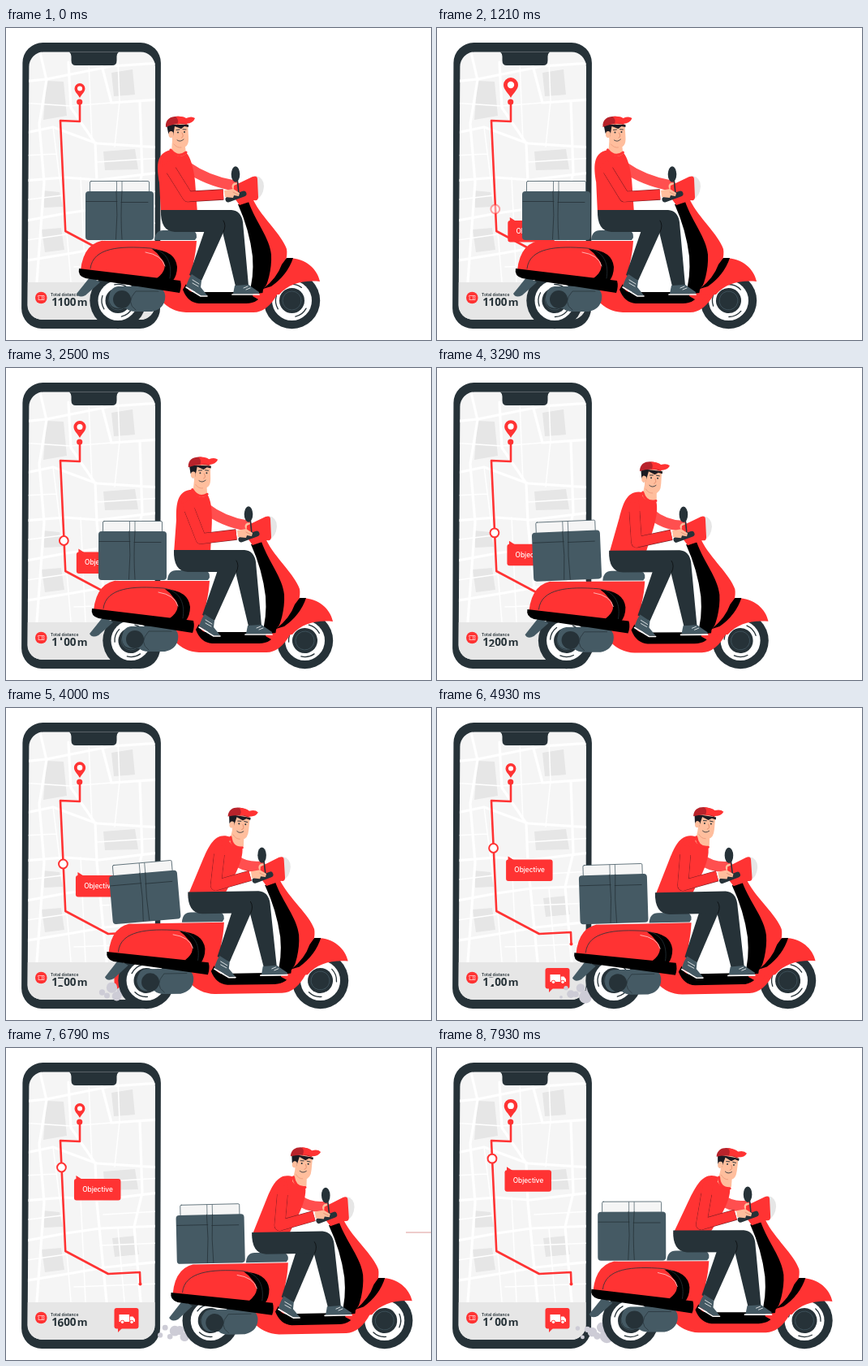
An HTML page with a canvas that plays this animation: 524 by 384 pixels, repeating every 8000 ms.

```html
<!DOCTYPE html>
<html lang="en">
<head>
<meta charset="utf-8">
<title>Scooter delivery</title>
<style>
html, body { margin: 0; width: 100%; height: 100%; overflow: hidden; background: #fff; }
canvas { display: block; width: 524px; height: 384px; }
</style>
</head>
<body>
<canvas id="stage"></canvas>
<script>
const W = 524, H = 384, LOOP = 8000;
const RED = '#ff3333', DARK = '#263238', SLATE = '#455a64', SKIN = '#ffbe9d', BLACK = '#000';
const canvas = document.getElementById('stage');
const ctx = canvas.getContext('2d');
const dpr = window.devicePixelRatio || 1;
canvas.width = W * dpr;
canvas.height = H * dpr;

// Monotone cubic through [time, value] points
function track(...pts) {
  const secant = i => (pts[i + 1][1] - pts[i][1]) / (pts[i + 1][0] - pts[i][0]);
  const slopes = pts.map((_, i) => {
    if (i === 0) return secant(0);
    if (i === pts.length - 1) return secant(i - 1);
    const a = secant(i - 1), b = secant(i);
    return a * b <= 0 ? 0 : 2 * a * b / (a + b);
  });
  return t => {
    let i = 0;
    while (i < pts.length - 2 && t > pts[i + 1][0]) i++;
    const [t0, v0] = pts[i], [t1, v1] = pts[i + 1];
    const d = t1 - t0, u = Math.min(1, Math.max(0, (t - t0) / d)), w = 1 - u;
    return v0 * (1 + 2 * u) * w * w + slopes[i] * d * u * w * w
      + v1 * u * u * (3 - 2 * u) - slopes[i + 1] * d * u * u * w;
  };
}

const rideX = track([0, 0], [1210, 7], [2500, 16], [3430, 23], [4000, 35], [4930, 80],
  [5140, 90], [6000, 112], [6500, 115], [6850, 114], [7300, 111.5], [7790, 105], [8000, 98]);
const lean = track([0, 0], [1210, .01], [2500, .25], [4000, 1], [4930, .96], [6790, .97], [8000, 1.08]);
const tilt = track([0, 0], [2500, 0], [3400, -.3], [4000, -.9], [4930, -1.15], [6790, -1.1], [8000, -.1]);
const boxTilt = track([0, 0], [2500, 0], [4000, -4], [4930, -.6], [6790, -.2], [8000, 0]);
const pinTop = track([0, 68], [860, 59.5], [1210, 61], [1790, 64], [2200, 66], [2500, 65], [3000, 62.5],
  [3430, 65], [4000, 66.3], [4930, 68], [6860, 68], [7710, 65.5], [8000, 62]);
const markY = track([0, 224], [1210, 223], [2500, 212.5], [4000, 192], [4930, 172.5], [6790, 147], [8000, 135.5]);
const digit = track([0, 1], [1210, 1], [2500, 1.39], [4000, 2.5], [4930, 3.56], [6790, 5.95], [8000, 7.45]);
const ramp = (t, a, b) => Math.min(1, Math.max(0, (t - a) / (b - a)));

function fill(d, color) {
  ctx.fillStyle = color;
  ctx.fill(new Path2D(d));
}
function line(d, color, width = 1) {
  ctx.strokeStyle = color;
  ctx.lineWidth = width;
  ctx.stroke(new Path2D(d));
}
function oval(x, y, rx, ry, color) {
  ctx.beginPath();
  ctx.ellipse(x, y, rx, ry, 0, 0, 7);
  ctx.fillStyle = color;
  ctx.fill();
}
const dot = (x, y, r, color) => oval(x, y, r, r, color);
function panel(x, y, w, h, r, color) {
  ctx.beginPath();
  ctx.roundRect(x, y, w, h, r);
  ctx.fillStyle = color;
  ctx.fill();
}
function label(s, x, y, font, color, align = 'center') {
  ctx.font = font;
  ctx.textAlign = align;
  ctx.fillStyle = color;
  ctx.fillText(s, x, y);
}
function group(draw) {
  ctx.save();
  draw();
  ctx.restore();
}
function turn(x, y, deg) {
  ctx.translate(x, y);
  ctx.rotate(deg * Math.PI / 180);
  ctx.translate(-x, -y);
}

function quad(points, r) {
  const p = new Path2D(), n = points.length;
  p.moveTo((points[0][0] + points[1][0]) / 2, points[0][1]);
  for (let i = 1; i <= n; i++) p.arcTo(...points[i % n], ...points[(i + 1) % n], r);
  p.closePath();
  return p;
}
const shell = quad([[20.5, 18], [191, 18], [190, 370], [19, 370]], 25);
const screen = quad([[28.5, 29.5], [184, 29.5], [183.5, 359], [26.5, 359]], 18);

function drawMap() {
  fill('M0 0H200V384H0Z', '#f5f5f5');
  const block = '#e6e6e6';
  fill('M50 65L71 66 75 108 46 113Z', block);
  fill('M130 55L156 51 159 82 133 84Z', block);
  fill('M120 152L159 149 163 174 122 175Z', block);
  fill('M45 200L66 202 70 220 47 221Z', block);
  fill('M44 248L68 246 72 273 48 276Z', block);
  fill('M131 234L160 231 164 254 134 257Z', block);
  line('M20 66L50 63 130 47 190 43M42 30L50 64 41 118 47 190 38 312M77 42L80 98 110 142 112 190 124 312' +
    'M20 130L58 122 112 142 190 147M20 188L72 184 115 187 190 178M20 238L74 228 116 222 190 219' +
    'M118 46L130 92 190 88M165 90L168 178 158 220 166 312M20 287L76 278 122 270 190 263', '#fff', 3.2);
  line('M20 92L80 96 130 92M102 42L106 140M138 40L140 90 134 146M58 122L66 184 73 228 80 312' +
    'M20 157L62 155M112 165L190 160M20 212L70 206M92 184L98 312M116 243L190 240M120 205L190 201' +
    'M138 222L146 312M20 262L74 254M84 294L190 290', '#fff', 1.5);
}

function drawPin(t) {
  const s = (86 - pinTop(t)) / 25;
  group(() => {
    ctx.translate(91, 86);
    ctx.scale(s, s);
    fill('M0 0C-3 -6 -9 -10 -9 -16A9 9 0 0 1 9 -16C9 -10 3 -6 0 0Z', RED);
    dot(0, -16, 4.2, '#fff');
  });
}

function drawCard(t) {
  fill('M20 313H190V360H20Z', '#e6e6e6');
  dot(43.3, 332, 7.3, RED);
  line('M40 329.5H47V331Q45.8 332 47 333V334.5H40V333Q41.2 332 40 331ZM44.7 330V334', '#fff', .6);
  label('Total distance', 55, 329.5, '600 5.1px Inter, sans-serif', DARK, 'left');
  const big = '700 13.5px "Open Sans", sans-serif';
  label('1', 60, 342, big, DARK);
  label('0', 75, 342, big, DARK);
  label('0', 82.7, 342, big, DARK);
  label('m', 87.7, 342, '700 13px "Open Sans", sans-serif', DARK, 'left');
  const n = digit(t), low = Math.floor(n);
  group(() => {
    ctx.beginPath();
    ctx.rect(62, 331.5, 9.5, 11.5);
    ctx.clip();
    for (let k = low; k <= low + 1; k++) label(k % 10, 67.4, 342 + (k - n) * 18, big, DARK);
  });
  panel(133.5, 320, 30, 25.5, 3, RED);
  fill('M138 344V350L144 344Z', RED);
  fill('M139.5 328H152V337H139.5ZM152.8 330.5H156.5L159 333.7V337H152.8Z', '#fff');
  for (const x of [143.5, 155]) {
    dot(x, 337.3, 2.5, RED);
    dot(x, 337.3, 1.7, '#fff');
  }
}

function drawMarker(t) {
  const y = markY(t), x = 73 - (250 - y) * .044;
  const grow = ramp(t, 350, 1000);
  if (grow > 0) group(() => {
    ctx.translate(x + 18, y + 10);
    ctx.scale(grow, grow);
    fill('M0 0V9H14Z', RED);
    panel(-2.5, 4, 57.5, 26.5, 3, RED);
    label('Objective', 26.5, 20, '500 8.3px Inter, sans-serif', '#fff');
  });
  group(() => {
    ctx.globalAlpha = .45 * ramp(t, 70, 1210) + .55 * ramp(t, 1210, 1900);
    ctx.beginPath();
    ctx.arc(x, y, 5.4, 0, 7);
    ctx.fillStyle = '#fff';
    ctx.fill();
    ctx.strokeStyle = RED;
    ctx.lineWidth = 2;
    ctx.stroke();
  });
}

function drawPhone(t) {
  ctx.fillStyle = DARK;
  ctx.fill(shell);
  group(() => {
    ctx.clip(screen);
    drawMap();
    drawCard(t);
    fill('M76 28Q80 30 80.5 35V40Q80.5 46 86 46H131Q136.5 46 136.5 40V35Q137 30 141 28Z', DARK);
    line('M91 92V115L67 114 73.3 250 126 278 165 276 165.5 290', RED, 2.6);
    dot(90.7, 91, 3.6, RED);
    dot(165.5, 290.5, 2, RED);
    drawPin(t);
    drawMarker(t);
  });
}

// Short speed lines that pass behind the rider
function drawStreaks(t) {
  for (const start of [660, 4060, 5500, 6740]) {
    const head = Math.max(305, 524 - (t - start) * .6);
    const tail = 524 - Math.max(0, t - start - 100) * .6;
    if (t > start && tail > head) line(`M${head} 227H${tail}`, '#dd9a98', 1);
  }
}

function drawSmoke(t, x) {
  for (let i = 0; i < 40; i++) {
    const age = (t - 3450 - i * 120) / 800;
    if (age < 0 || age > 1) continue;
    const r = (7.5 + 2 * Math.sin(i * 4.1)) * (1 - age * .75);
    dot(x + 111 - 40 * age, 350 + 6 * Math.sin(i * 2.4), r, '#cdccd6');
  }
}

function drawWheel(x, spin) {
  group(() => {
    ctx.translate(x, 335.5);
    dot(0, 0, 34.7, DARK);
    dot(0, 0, 24.5, '#fff');
    ctx.rotate(spin);
    ctx.strokeStyle = DARK;
    ctx.lineWidth = 1.3;
    for (const a of [.5, 2.6, 4.5]) {
      ctx.beginPath();
      ctx.arc(0, 0, 20, a, a + .85);
      ctx.stroke();
    }
    dot(0, 0, 15.5, DARK);
    ctx.beginPath();
    ctx.arc(0, 0, 11.5, 0, 7);
    ctx.strokeStyle = SLATE;
    ctx.lineWidth = .7;
    ctx.stroke();
  });
}

function drawCargo(t) {
  const a = boxTilt(t);
  group(() => {
    ctx.translate(0, a * .4);
    turn(140, 261, a);
    ctx.beginPath();
    ctx.roundRect(103.5, 188.5, 73, 14, 1.5);
    ctx.fillStyle = '#f5f5f5';
    ctx.fill();
    ctx.strokeStyle = SLATE;
    ctx.lineWidth = .8;
    ctx.stroke();
    line('M136.5 189V201M143 189V201', SLATE, .7);
    panel(98, 201, 84, 60, 4, SLATE);
    line('M99 213.5H137M142 214.5H175M136 201Q138 230 135.5 260M143 201Q141 232 143 260', DARK, .8);
  });
}

function drawScooter() {
  fill('M104 306L116 313 98 329Q90 333 87 327Z', SLATE);
  // rear body and footboard
  fill('M117 262H235Q234 277 231 289Q228 309 229 325L235 333Q262 338 304 329L318 320 326 310 335 327Q322 350 305 350H222Q203 349 191 335L188 312 92 298Q96 262 125 261Z', RED);
  fill('M222 315Q224 325 231 325H300L312 300 318 324Q312 339 296 339H238Q224 338 218 322Z', BLACK);
  // engine
  fill('M138 318H186Q198 322 196 334Q194 346 180 349H160Q152 349 148 345H138Q127 344 127 332Q128 319 138 318Z', SLATE);
  dot(143, 334, 11, DARK);
  line('M160 347Q147 338 160 324H188', DARK, .7);
  // cowl
  fill('M180 272Q209 274 211 294 211 305 205 312L186 308Q203 295 190 282 186 276 180 272Z', BLACK);
  line('M104 296C107 270 141 268 178 271 200 274 205 292 202 308', DARK, .8);
  line('M172 276Q192 279 196 293', '#ffd0d0', .8);
  fill('M90 296L215 311Q217 318 214 326L98 308Q88 305 90 296Z', BLACK);
  // seat
  fill('M183 261Q184 249 194 249H228Q236 250 235 258L233 261Z', SLATE);
  // leg shield
  fill('M284 207L305 212C316 234 340 254 346 272 349 289 333 318 318 338L304 330Q316 290 299 250Z', RED);
  fill('M286 217L299 214C308 239 325 258 327 279 328 298 322 316 317 326L299 328Q306 308 304 281 300 248 286 217Z', BLACK);
}

function drawFender() {
  fill('M317 322C329 307 338 284 348 283 370 283 384 297 387 312 366 310 348 315 337 328L316 329Z', RED);
  fill('M346 283H354Q347 304 327 318L317 321Q334 308 340 291Z', BLACK);
}

function drawHandlebar() {
  fill('M308 182Q318 184 318 195 317 207 309 211Z', '#e6e6e6');
  fill('M281 194L304 183Q310 181 310 186L311 208Q311 213 306 212L288 218 280 207Z', RED);
  line('M287 204L285 184', DARK, 1.6);
  oval(283, 180, 5.3, 9.7, DARK);
}

function drawLegs() {
  fill('M246 246L270 247 241 311 226 304Z', DARK);
  fill('M229 303L241 311 240 319 248 329H240L222 318Q225 308 229 303Z', SLATE);
  line('M222 319L240 330H248', '#fff', 1.6);
  line('M230 310L238 315M230 314L237 318', '#fff', .8);
  fill('M191 224H278Q290 225 292 239L299 317 283 318 267 251H208Q190 250 191 224Z', DARK);
  line('M268 251Q272 243 268 237', '#000', .6);
  fill('M282 317L299 316 312 325V327H280Z', SLATE);
  line('M279 328H312', '#fff', 1.7);
  line('M293 320L298 318M296 322L301 320', '#fff', .8);
}

function drawHead() {
  fill('M205 138H220L222 155Q213 162 204 152Z', SKIN);
  fill('M203 118H224L225 134Q226 147 217 147 208 147 205 138Z', SKIN);
  line('M207 143Q211 148 216 147', '#eb9a7c', .8);
  fill('M198 119H225V122L220 121 216 124 208 121 206 133 203 135 200 129Z', '#1b1b22');
  oval(203.5, 131, 3, 4, SKIN);
  dot(212, 128.5, 1, DARK);
  dot(220, 128, 1, DARK);
  line('M210 125.5L214 125M218 124.7L222 125', DARK, .9);
  line('M217 129Q220 134 216.5 135', '#d97f60', .7);
  line('M211 138Q215 141 219 137', DARK, .8);
  fill('M197 122C196 111 205 108 214 109 221 110 222 114 223 119Q211 116 197 122Z', '#b8232b');
  fill('M209 109Q218 108 222 111 229 108 233 111 231 117 222 118 216 116 211 119 214 113 209 109Z', RED);
}

// Elbow of a two-part arm bending downwards
function elbow([sx, sy], [hx, hy], a, b) {
  const dx = hx - sx, dy = hy - sy, d = Math.min(a + b - .01, Math.hypot(dx, dy));
  const ang = Math.atan2(dy, dx) + Math.acos((a * a + d * d - b * b) / (2 * a * d));
  return [sx + a * Math.cos(ang), sy + a * Math.sin(ang)];
}

function drawRider(t) {
  const deg = 34 * lean(t), r = deg * Math.PI / 180, c = Math.cos(r), s = Math.sin(r);
  const up = (x, y) => [212 + (x - 212) * c - (y - 222) * s, 222 + (x - 212) * s + (y - 222) * c];
  const neck = up(212, 152);

  const farTop = up(222, 170), farHand = [281, 194];
  const bend = [(farTop[0] + farHand[0]) / 2 - 4, (farTop[1] + farHand[1]) / 2 + 6];
  line(`M${farTop}Q${bend} ${farHand}`, '#ff4f4f', 13);
  dot(283, 195, 4.5, SKIN);
  drawHandlebar();

  fill(`M191 228L${up(189, 190)}C${up(186, 172)} ${up(184, 154)} ${up(203, 150)}` +
    `L${up(222, 153)}Q${up(230, 162)} ${up(233, 188)}L236 228Z`, RED);
  group(() => {
    ctx.translate(neck[0] - 212, neck[1] - 152);
    turn(212, 152, deg * .3);
    drawHead();
  });
  line(`M${up(203, 150)}Q${up(212, 161)} ${up(222, 153)}`, RED, 3);
  drawLegs();

  line('M274 211L293 204', DARK, 7);
  const top = up(198, 166), hand = [268, 205], mid = elbow(top, hand, 49, 44);
  const part = top.map((v, i) => v + (mid[i] - v) * .22);
  const arm = `M${top}L${mid}L${hand}`;
  ctx.lineCap = 'butt';
  line(`M${part}L${mid}L${hand}`, '#7d1c22', 13.4);
  ctx.lineCap = 'round';
  line(`M${top}L${mid}`, RED, 12.2);
  ctx.lineCap = 'butt';
  line(arm, RED, 12.2);
  ctx.lineCap = 'round';
  fill('M269 200L280 198 288 203 287 207 281 206 280 209 270 208Z', SKIN);
  line('M280 202L286 205', '#d9886c', .7);
}

function draw(t) {
  ctx.setTransform(dpr, 0, 0, dpr, 0, 0);
  ctx.fillStyle = '#fff';
  ctx.fillRect(0, 0, W, H);
  ctx.lineCap = ctx.lineJoin = 'round';
  const x = rideX(t);
  drawPhone(t);
  drawSmoke(t, x);
  drawStreaks(t);
  group(() => {
    ctx.translate(x, 0);
    drawWheel(138, x / 35);
    drawWheel(352.5, x / 35);
    group(() => {
      turn(352, 335, tilt(t));
      drawScooter();
      drawFender();
      drawCargo(t);
      drawRider(t);
    });
  });
}

const begin = performance.now();
function tick() {
  draw((performance.now() - begin) % LOOP);
  requestAnimationFrame(tick);
}
tick();
</script>
</body>
</html>
```
